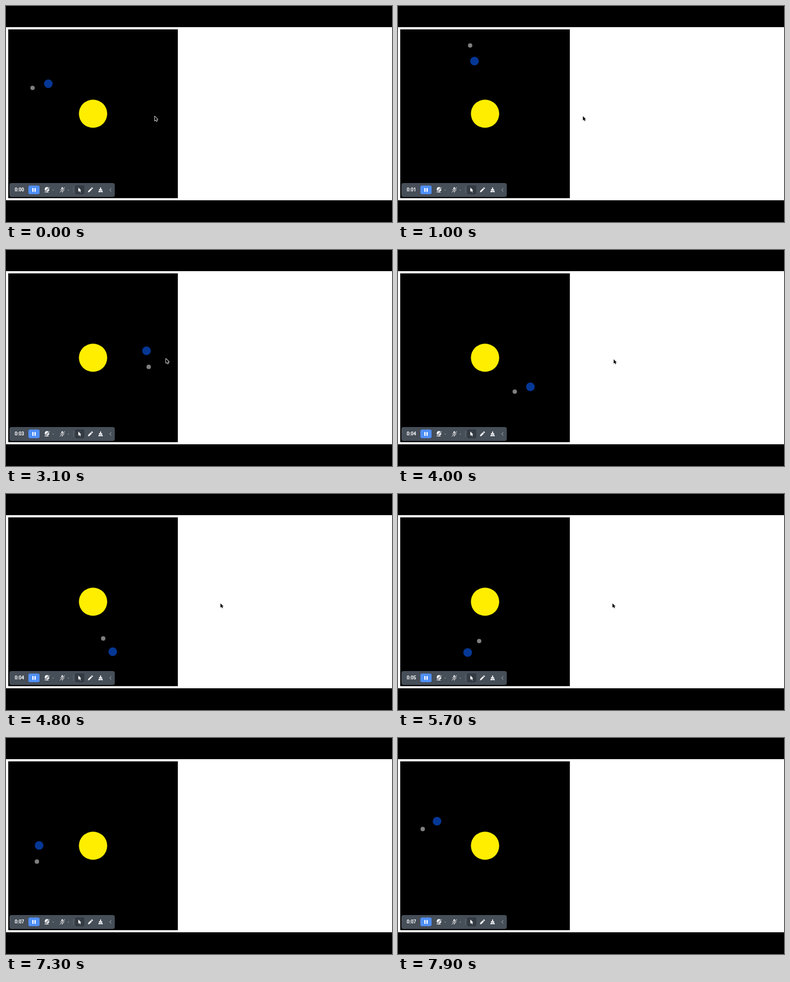
Recreate the animation shown at these times as an HTML page. Size 690 by 388 pixels, loop 8 s.

```html
<!DOCTYPE html>
<html lang="en">
<head>
<meta charset="utf-8">
<title>Orbit</title>
<style>
  html, body { margin: 0; width: 100%; height: 100%; overflow: hidden; background: #000; }
  svg { display: block; width: 690px; height: 388px; }
  #scene { filter: blur(.35px); }
  #time { font: 700 8.5px Roboto, Arial, sans-serif; fill: #fff; }
  .line { fill: none; stroke: #fff; stroke-linecap: round; stroke-linejoin: round; }
  .gap { stroke: #464e58; stroke-width: 2.2; }
</style>
</head>
<body>
<svg viewBox="0 0 690 388">
  <defs>
    <path id="arrow" d="M0 0V7.6L1.8 6L3 8.7L4.3 8.1L3.1 5.5H5.3Z"/>
    <path id="caret" d="M-1.6 -.7H1.6L0 1Z" fill="#89919b"/>
  </defs>

  <g id="scene">
    <rect x="-9" y="38" width="708" height="311" fill="#fff"/>
    <rect x="4" y="42" width="303.2" height="303.2"/>
    <circle id="sun" r="25.3" fill="#ffee00"/>
    <circle id="earth" r="7.7" fill="#053795"/>
    <circle id="moon" r="3.9" fill="#808080"/>
  </g>

  <g id="toolbar">
    <rect x="6" y="318" width="188.5" height="25" rx="4" fill="#464e58"/>
    <text id="time" x="15.4" y="333.1">0:00</text>

    <rect x="40" y="322.6" width="20" height="15.4" rx="3" fill="#4f8ff7"/>
    <path d="M47 327h2.2v6.8H47zM50.9 327h2.2v6.8h-2.2z" fill="#fff"/>

    <!-- camera off -->
    <circle cx="73.3" cy="329.2" r="4" fill="#fff"/>
    <path d="M69.6 335q3.7-2.6 7.4 0z" fill="#fff"/>
    <path class="gap" d="M69 334.5L77.6 326"/>
    <path class="line" d="M69 334.7L77.6 326"/>
    <use href="#caret" x="84.4" y="330.8"/>

    <!-- microphone off -->
    <rect x="99.1" y="325.6" width="3.2" height="5.6" rx="1.6" fill="#fff"/>
    <path class="line" stroke-width=".9" d="M97.6 329.5q0 3.2 3.1 3.2t3.1-3.2M100.7 332.7V334.8"/>
    <path class="gap" d="M96.6 334.2L104.8 326"/>
    <path class="line" d="M96.6 334.4L104.8 326.2"/>
    <use href="#caret" x="111.5" y="330.8"/>

    <path d="M120.5 325V336" stroke="#656d77" stroke-width=".8"/>

    <rect x="123.5" y="322.3" width="16.5" height="16" rx="3" fill="#343a42"/>
    <use href="#arrow" x="129.3" y="326.1" fill="#fff"/>

    <!-- pencil -->
    <path d="M146.5 334.7l.6-2.6 4.5-4.5 2 2-4.5 4.5zM152.2 327l1-1q.5-.4 1 0l1 1q.4.5 0 1l-1 1z" fill="#fff"/>

    <!-- brush -->
    <path d="M168.2 326h1.7v3.1h2v1.7h-5.7v-1.7h2zM166 331.4h6.1l1 3.2h-8.1z" fill="#fff"/>
    <path d="M168 332.7v2M170.3 332.7v2" stroke="#464e58" stroke-width=".6"/>

    <path class="line" style="stroke:#b3b8be" d="M187.9 327.8L185.5 330.4L187.9 333"/>
  </g>

  <use id="cursor" href="#arrow" stroke="#eee" stroke-width="1.6" paint-order="stroke" stroke-linejoin="round"/>
</svg>

<script>
const LOOP = 8000, STEP = 100, POINTER_END = 6500;
const SUN = { x: 155.6, y: 193.5 };
const $ = id => document.getElementById(id);

// Pointer moves: each eases from the previous place
const moves = [
  { from: 100, to: 500, x: 361, y: 204 },
  { from: 600, to: 900, x: 330.6, y: 198 },
  { from: 2100, to: 2600, x: 286, y: 195.4 },
  { from: 3100, to: 3400, x: 393.5, y: 196.4 },
  { from: 3600, to: 3700, x: 385.6, y: 196.4 },
  { from: 4100, to: 4300, x: 383.4, y: 196.4 },
];

function pointerAt(t) {
  let x = 265.8, y = 198.3;
  for (const m of moves) {
    const f = Math.min(1, Math.max(0, (t - m.from) / (m.to - m.from)));
    const e = f * f * (3 - 2 * f);
    x += (m.x - x) * e;
    y += (m.y - y) * e;
  }
  return { x, y };
}

function place(id, { x, y }) {
  $(id).setAttribute("transform", `translate(${x} ${y})`);
}

function orbit(center, radius, degrees) {
  const a = degrees * Math.PI / 180;
  return { x: center.x + radius * Math.cos(a), y: center.y + radius * Math.sin(a) };
}

function draw(t) {
  // The moon circles twice as fast as the planet
  const turn = 0.0447 * t + 0.6;
  const earth = orbit(SUN, 96.4, 213.4 + turn);
  place("earth", earth);
  place("moon", orbit(earth, 29.2, 164 + 2 * turn));

  place("cursor", pointerAt(t));
  $("cursor").style.display = t < POINTER_END ? "" : "none";
  $("time").textContent = "0:0" + Math.floor(t / 1000);
}

place("sun", SUN);
const start = performance.now();
function tick() {
  const t = (performance.now() - start) % LOOP;
  draw(Math.floor(t / STEP) * STEP);
  requestAnimationFrame(tick);
}
tick();
</script>
</body>
</html>
```
